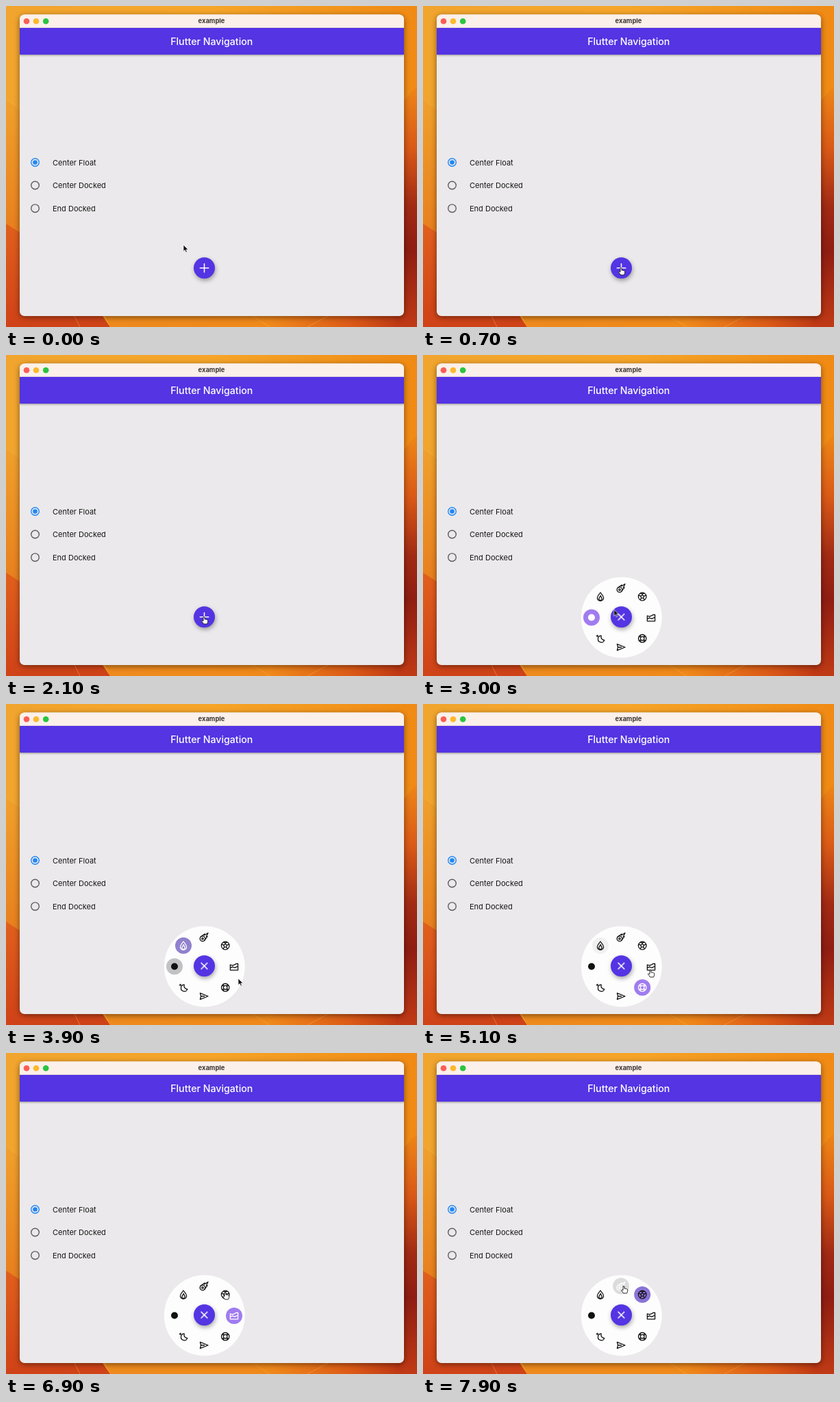
These frames come from a looping animation (600 px wide and 469 px high, 8000 ms). An HTML page:

```html
<!DOCTYPE html>
<html lang="en">
<head>
<meta charset="utf-8">
<title>Flutter Navigation</title>
<style>
html, body { margin: 0; width: 100%; height: 100%; overflow: hidden; background: #ee9422; }
svg { display: block; width: 600px; height: 469px; }
text { font-family: Inter, Roboto, sans-serif; }
.label { font-size: 11px; fill: #161616; }
.window { filter: drop-shadow(0 2px 4px #0007); }
.bar { filter: drop-shadow(0 1.5px 1.5px #0006); }
.fab { filter: drop-shadow(1px 3px 3px #0005); }
.icon { fill: none; stroke: currentColor; stroke-width: 1.3; stroke-linejoin: round; stroke-linecap: round; color: #111; }
.solid { fill: currentColor; stroke: none; }

.menu { transform-origin: 289.8px 383.5px; animation: menu 8s ease-out infinite; }
.plus { transform-origin: 289.5px 382.7px; animation: plus 8s ease-out infinite; }
.cursor { animation: move 8s ease-in-out infinite; }
.hand, .arrow { animation: hand 8s step-end infinite; }
.arrow { animation-name: arrow; }

@keyframes menu {
  0%, 10.6% { transform: scale(0); }
  13.75%, 21.9% { transform: scale(1); }
  25%, 32.5% { transform: scale(0); }
  35.6%, 100% { transform: scale(1); }
}
@keyframes plus {
  0%, 10.6% { transform: rotate(0); }
  13.75%, 21.9% { transform: rotate(45deg); }
  25%, 32.5% { transform: rotate(0); }
  35.6%, 100% { transform: rotate(45deg); }
}
@keyframes move {
  0%, 1% { transform: translate(259px, 349px); }
  8.75%, 35% { transform: translate(289px, 382px); }
  41.25%, 43.75% { transform: translate(258px, 351px); }
  48.75% { transform: translate(339px, 401px); }
  53.75%, 57.5% { transform: translate(319px, 412px); }
  63.75%, 75% { transform: translate(332px, 388px); }
  81.25%, 88.75% { transform: translate(320px, 349px); }
  95%, 100% { transform: translate(293px, 340px); }
}
@keyframes hand {
  0%, 44.8%, 58.6%, 76.5%, 90.2% { opacity: 0; }
  6%, 39.5%, 52%, 62%, 79%, 93% { opacity: 1; }
  36.5% { opacity: 0; }
}
@keyframes arrow {
  0%, 44.8%, 58.6%, 76.5%, 90.2% { opacity: 1; }
  6%, 39.5%, 52%, 62%, 79%, 93% { opacity: 0; }
  36.5% { opacity: 1; }
}
</style>
</head>
<body>
<svg viewBox="0 0 600 469">
  <defs>
    <linearGradient id="top"><stop stop-color="#f1a52e"/><stop offset=".5" stop-color="#f6a529"/><stop offset="1" stop-color="#f08a14"/></linearGradient>
    <linearGradient id="left" x2="0" y2="1"><stop stop-color="#f0a02c"/><stop offset="1" stop-color="#e77d1d"/></linearGradient>
    <linearGradient id="ember" x2="0" y2="1"><stop stop-color="#e0601c"/><stop offset="1" stop-color="#cf4218"/></linearGradient>
    <linearGradient id="right" x2="0" y2="1"><stop stop-color="#ee8616"/><stop offset=".25" stop-color="#da5a17"/><stop offset=".5" stop-color="#a12a14"/><stop offset=".68" stop-color="#8f1d12"/><stop offset="1" stop-color="#c03a15"/></linearGradient>
    <linearGradient id="low"><stop stop-color="#ee8b1e"/><stop offset=".55" stop-color="#f0891a"/><stop offset=".8" stop-color="#dc5a17"/><stop offset="1" stop-color="#b42d13"/></linearGradient>
    <clipPath id="frame"><rect x="20" y="12.5" width="561" height="440.5" rx="7"/></clipPath>
  </defs>

  <rect width="600" height="469" fill="url(#top)"/>
  <path d="M0 136L30 158V345L0 318Z" fill="url(#left)"/>
  <path d="M0 318Q90 372 152 469H0Z" fill="url(#ember)"/>
  <path d="M152 469Q140 440 120 420H600V469Z" fill="url(#low)"/>
  <path d="M600 118Q585 130 570 155V469H600Z" fill="url(#right)"/>
  <path d="M0 136L22 152M100 453L108 469M360 453L385 469M470 453L440 469" fill="none" stroke="#f6b04a" stroke-opacity=".5"/>

  <g class="window"><rect x="20" y="12.5" width="561" height="440.5" rx="7" fill="#ebe9eb"/></g>
  <g clip-path="url(#frame)">
    <rect x="20" y="12" width="561" height="21" fill="#fbf0ea"/>
    <rect class="bar" x="20" y="32" width="561" height="39" fill="#5434e3"/>
  </g>
  <circle cx="30" cy="22.3" r="4.3" fill="#fb5d55"/>
  <circle cx="44" cy="22.3" r="4.3" fill="#fbb92c"/>
  <circle cx="58.2" cy="22.3" r="4.3" fill="#2bc440"/>
  <text x="300" y="25.4" text-anchor="middle" font-size="9.4" font-weight="700" fill="#3b3431">example</text>
  <text x="300.3" y="56.8" text-anchor="middle" font-size="14.2" font-weight="500" fill="#fff">Flutter Navigation</text>

  <g fill="none" stroke="#5c5b5d" stroke-width="1.4">
    <circle cx="42.5" cy="228.5" r="5.8" stroke="#2187f5"/>
    <circle cx="42.5" cy="228.5" r="3.3" fill="#2187f5" stroke="none"/>
    <circle cx="42.5" cy="262" r="5.8"/>
    <circle cx="42.5" cy="295.7" r="5.8"/>
  </g>
  <text class="label" x="68" y="232.5">Center Float</text>
  <text class="label" x="68" y="266">Center Docked</text>
  <text class="label" x="68" y="299.7">End Docked</text>

  <g class="menu">
    <circle cx="289.8" cy="383.5" r="59" fill="#fdfdfd"/>
    <g id="badge" transform="translate(246 383.5)"><circle class="disc" r="12" fill="none"/>
      <g class="icon"><circle class="solid" r="5"/></g></g>
    <g id="flame" transform="translate(259 353)"><circle class="disc" r="12" fill="none"/>
      <g class="icon"><path d="M0-6C2-3 4.6-1 4.6 2A4.6 4.3 0 0 1-4.6 2C-4.6-1-2-3 0-6Z"/><path d="M.2-1.5C.6 .5 2.2 1 2.2 3.2A2.2 2.2 0 0 1-2.2 3.2C-2.2 1.5-.4 .6 .2-1.5Z"/></g></g>
    <g id="comet" transform="translate(289 340.5)"><circle class="disc" r="12" fill="none"/>
      <g class="icon"><path d="M-4.9-.2L1-4.5 .8-2.7 6-6 3.4-.8 5-.9 .6 5"/><circle cx="-2" cy="2.4" r="3.8"/><circle cx="-2" cy="2.4" r="1.2"/></g></g>
    <g id="ball" transform="translate(320.2 353)"><circle class="disc" r="12" fill="none"/>
      <g class="icon"><circle r="5.8"/><path d="M0-2.4L2.4-.6 1.5 2.1H-1.5L-2.4-.6ZM0-2.4V-4M2.4-.6L5-1.8M1.5 2.1L3 4.6M-1.5 2.1L-3 4.6M-2.4-.6L-5-1.8M-2.5-4.8L0-3.8 2.5-4.8"/></g></g>
    <g id="chart" transform="translate(333 384)"><circle class="disc" r="12" fill="none"/>
      <g class="icon"><path d="M-5.6 4.8V-3L-2.4-1.8 1.2-3.4 3-4.5H5.6V4.8ZM-5.6 1.6L-2.5 .2 1.2 1.4 5.6-1"/></g></g>
    <g id="buoy" transform="translate(320.2 414.2)"><circle class="disc" r="12" fill="none"/>
      <g class="icon"><circle r="5.7"/><circle r="2.8"/><path d="M-2.4-2.4L-3.6-3.6M2.4-2.4L3.6-3.6M2.4 2.4L3.6 3.6M-2.4 2.4L-3.6 3.6" stroke-width="2.6" stroke-linecap="butt"/></g></g>
    <g transform="translate(289 427)">
      <g class="icon"><path d="M-5.6-4.6L6 0-5.6 4.6-4.4 0ZM-4.4 0H.5"/></g></g>
    <g transform="translate(259 414)">
      <g class="icon"><path d="M1.2-3.8A4.8 4.8 0 1 0 5.8 2.6 4.8 4.8 0 0 1 1.2-3.8Z"/><path class="solid" d="M-4.5-5.8L-3.8-4.2-2.2-3.5-3.8-2.8-4.5-1.2-5.2-2.8-6.8-3.5-5.2-4.2Z"/></g></g>
  </g>

  <circle class="fab" cx="289.5" cy="382.7" r="15.5" fill="#5434e3"/>
  <path class="plus" d="M282.7 382.7H296.3M289.5 375.9V389.5" stroke="#fff" stroke-width="1.5"/>

  <g class="cursor" stroke-linejoin="round">
    <path class="arrow" d="M0 0V9.6L2.2 7.6 3.7 11 5.4 10.3 3.9 7H6.9Z" fill="#111" stroke="#fff" stroke-width=".7"/>
    <path class="hand" d="M-1 1Q0-.3 1 1V4.2Q2.2 3.4 2.8 4.5 4 3.9 4.5 5 5.8 4.8 5.8 6.2 5.8 9 4.6 11H-.4Q-1.8 8.6-3.6 6.8-3.2 5.2-1 6.6Z" fill="#fff" stroke="#111" stroke-width=".9"/>
  </g>
</svg>
<script>
const LOOP = 8000, NONE = '#fdfdfd00', PURPLE = '#a07cf0';
const loop = { duration: LOOP, iterations: Infinity };

// [id, time picked, time dropped]
const picks = [
  ['badge', -LOOP, 3500],
  ['flame', 3500, 4500],
  ['buoy', 4500, 5600],
  ['chart', 5600, 7000],
  ['ball', 7000, 7800],
  ['comet', 7800, 2 * LOOP]
];
const rise = [[0, NONE], [100, '#dcdcdc'], [400, '#9181cd'], [600, PURPLE]];
const fall = [[0, PURPLE], [100, '#8b74d6'], [400, '#c2c2c5'], [600, '#f1f1f1'], [800, NONE]];

function animate(el, prop, stops, easing = 'linear') {
  el.animate(stops.map(([t, v]) => ({ offset: t / LOOP, [prop]: v, easing })), loop);
}

for (const [id, on, off] of picks) {
  const at = (base, list) => list.map(([t, v]) => [base + t, v]);
  const fills = [...at(on, rise), ...at(off, fall)].filter(([t]) => t > 0 && t < LOOP);
  const first = on < 0 ? PURPLE : NONE;
  const last = id === 'comet' ? '#c4bad6' : id === 'ball' ? '#9a8bd0' : NONE;
  animate(document.querySelector(`#${id} .disc`), 'fill', [[0, first], ...fills, [LOOP, last]]);

  const inks = [[on, '#fff'], [off, '#111']].filter(([t]) => t > 0 && t < LOOP);
  const ink = on < 0 ? '#fff' : '#111';
  animate(document.querySelector(`#${id} .icon`), 'color',
    [[0, ink], ...inks, [LOOP, off > LOOP ? '#fff' : '#111']], 'step-end');
}
</script>
</body>
</html>
```
